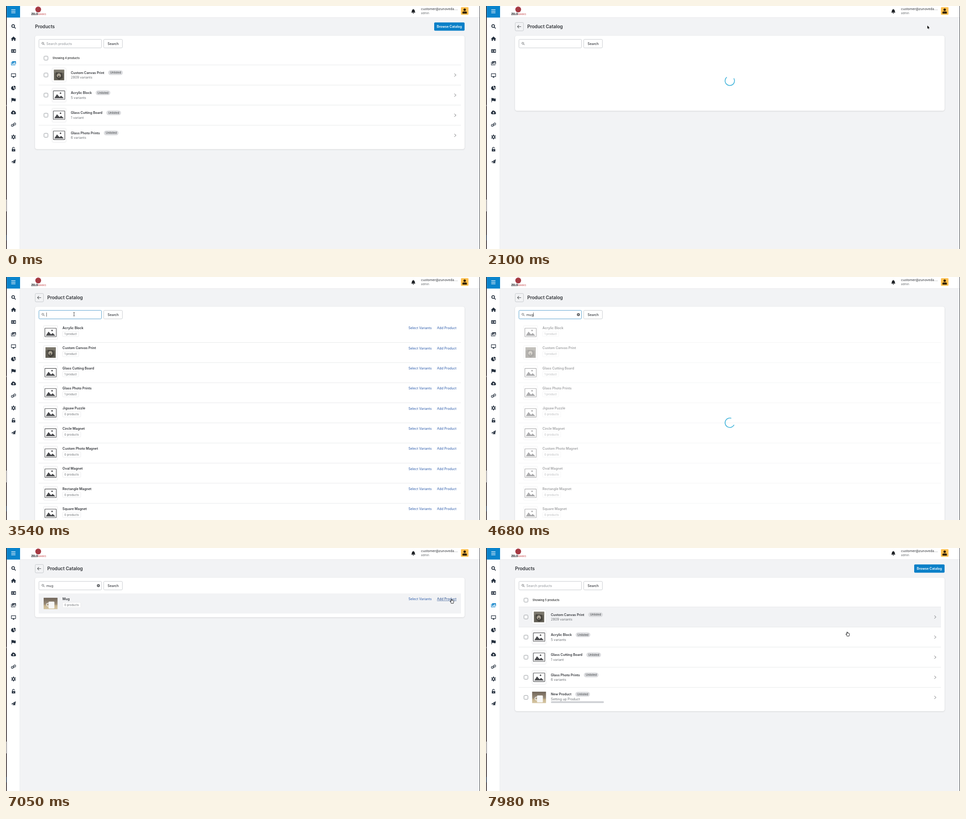
Animation, 1045 px wide and 536 px high, one loop 8000 ms. Source, as an HTML page with a canvas:

```html
<!DOCTYPE html>
<html lang="en">
<head>
<meta charset="utf-8">
<title>Product catalog</title>
<style>
html, body { margin: 0; width: 100%; height: 100%; overflow: hidden; background: #f2f3f5; }
canvas { display: block; width: 1045px; height: 536px; }
</style>
</head>
<body>
<canvas id="stage"></canvas>
<script>
const W = 1045, H = 536, LOOP = 8000, ROW = 44.33;
const INK = '#303338', GREY = '#6d7175', LINE = '#e1e3e5', EDGE = '#babfc3', BLUE = '#0a80c8', LINK = '#2c5cab', BG = '#f2f3f5';
const stage = document.getElementById('stage');
const dpr = window.devicePixelRatio || 1;
stage.width = W * dpr;
stage.height = H * dpr;
const g = stage.getContext('2d');

const catalog = ['Acrylic Block', 'Custom Canvas Print', 'Glass Cutting Board', 'Glass Photo Prints', 'Jigsaw Puzzle',
  'Circle Magnet', 'Custom Photo Magnet', 'Oval Magnet', 'Rectangle Magnet', 'Square Magnet'];
const products = [['Custom Canvas Print', '2809 variants'], ['Acrylic Block', '5 variants'],
  ['Glass Cutting Board', '1 variant'], ['Glass Photo Prints', '6 variants'], ['New Product', 'Setting up Product']];

// Sidebar icons: fill path, stroke path, stroke width
const icons = [
  ['', 'M2.2-.8a3 3 0 1 0-6 0a3 3 0 1 0 6 0M1.5 1.5L4.2 4.2', 1.7],
  ['M-5.5 .2L0-4.8L5.5 .2L4.2 .8V4.6H1.2V1.6H-1.2V4.6H-4.2V.8Z', ''],
  ['M-5.2-3.8H5.2V3.8H-5.2ZM-4-1.5H-.6V-.5H-4ZM-4 .8H-.6V1.8H-4ZM1.2-1.5H4V1.8H1.2Z', ''],
  ['M-3.2-4.4H5.4V2H-3.2ZM-2 1L.2-1.6L1.2-.6L3-2.6L4.4-.2V1Z', 'M-4.8-2.4V3.9H3.6', 1.1],
  ['M-1.2 2.5H1.2L1.8 4.6H-1.8Z', 'M-4.7-4H4.7V2.2H-4.7Z', 1.2],
  ['M-.6-4V.5L2.7 3.7A4.6 4.6 0 1 1-.6-4ZM.6-4.8A4.6 4.6 0 0 1 5-.4H.6ZM1 .6H5A4.6 4.6 0 0 1 3.7 3.3Z', ''],
  ['M-4.6-4.8H-3.6V4.8H-4.6ZM-3.6-4Q-1.5-5 .6-3.9T4.8-3.9V1.8Q2.5 2.8 .6 1.8T-3.6 1.8Z', ''],
  ['M-3.4 4A2.7 2.7 0 0 1-4-1.2A3.3 3.3 0 0 1 1.6-3.2A2.2 2.2 0 0 1 4-.6A2.4 2.4 0 0 1 3.4 4ZM0-1.4L2 .8H.7V2.8H-.7V.8H-2Z', ''],
  ['', 'M-.8 1.4A2 2 0 0 1-.6-1.4L1.2-3.2A2.1 2.1 0 0 1 4.2-.2L3 1M.8-1.4A2 2 0 0 1 .6 1.4L-1.2 3.2A2.1 2.1 0 0 1-4.2 .2L-3-1', 1.3],
  ['', 'M-2.7 0a2.7 2.7 0 1 0 5.4 0a2.7 2.7 0 1 0-5.4 0M0-4.7V-3M0 4.7V3M-4.1-2.35L-2.6-1.5M4.1 2.35L2.6 1.5M-4.1 2.35L-2.6 1.5M4.1-2.35L2.6-1.5', 1.8],
  ['M-3.8-.4H3.8V4.8H-3.8ZM-.6 1.2H.6V3.2H-.6Z', 'M-2.4-.4V-2.2A2.4 2.4 0 0 1 2.2-2.8', 1.3],
  ['M-5 .8L5-5L3.4 4.2L.2 2.8L-1.4 4.9V2.2L3-2.6L-2.6 1.8Z', '']
].map(([f, s, w]) => [new Path2D(f), new Path2D(s), w]);
const arrowPath = new Path2D('M0 0V8.4L1.9 6.6L3.2 9.4L4.6 8.8L3.3 6.1H6Z');
const handPath = new Path2D('M-.9 .4Q0-.6 .9 .4V3Q2-.0 2.6 3.2Q3.8 2.4 4.2 3.6Q5.6 3.2 5.6 4.8V7Q5 8.4 4.8 10H-.6Q-1 8.4-2.6 6.6Q-4 4.6-2.6 4.6L-.9 6Z');
const bellPath = new Path2D('M-4.6 3Q-3.3 1.6-3.2-1A3.2 3.4 0 0 1-.6-4.2V-5.2H.6V-4.2A3.2 3.4 0 0 1 3.2-1Q3.3 1.6 4.6 3ZM-1.4 3.7H1.4Q1.2 5.2 0 5.2T-1.4 3.7Z');

// Pointer path: time, x, y, easing of the segment leading there
const keys = [
  [390, 620, 420], [1170, 973, 43, 'both'], [2480, 973, 43], [2700, 380, 84, 'both'], [2850, 380, 84],
  [3390, 150, 82, 'both'], [5610, 150, 82], [6030, 855, 137, 'in'], [6390, 986, 114, 'out'],
  [6420, 986, 114], [6690, 982, 113, 'both'], [7590, 982, 113], [8370, 612, 257, 'both']
];
const easings = { in: u => u ** 1.5, out: u => 1 - (1 - u) ** 2, both: u => u * u * (3 - 2 * u) };

function pointerAt(t) {
  const i = keys.findIndex(k => k[0] > t);
  if (i < 1) return keys[0].slice(1, 3);
  const [t0, x0, y0] = keys[i - 1], [t1, x1, y1, ease] = keys[i];
  const u = (t - t0) / (t1 - t0), s = ease ? easings[ease](u) : u;
  return [x0 + (x1 - x0) * s, y0 + (y1 - y0) * s];
}

function text(s, x, cy, size = 7.28, color = INK, weight = 400) {
  g.font = `${weight} ${size}px Inter, sans-serif`;
  g.fillStyle = color;
  g.fillText(s, x, cy + size * .36);
  return g.measureText(s).width;
}
function rect(x, y, w, h, color) {
  g.fillStyle = color;
  g.fillRect(x, y, w, h);
}
function box(x, y, w, h, r, fill, stroke, width = .8) {
  g.beginPath();
  g.roundRect(x, y, w, h, r);
  if (fill) { g.fillStyle = fill; g.fill(); }
  if (stroke) { g.strokeStyle = stroke; g.lineWidth = width; g.stroke(); }
}
function disc(x, y, r, color) {
  g.beginPath();
  g.arc(x, y, r, 0, 7);
  g.fillStyle = color;
  g.fill();
}
function poly(pts, color, width) {
  g.beginPath();
  for (let i = 0; i < pts.length; i += 2) g.lineTo(pts[i], pts[i + 1]);
  if (width) { g.strokeStyle = color; g.lineWidth = width; g.stroke(); }
  else { g.fillStyle = color; g.fill(); }
}
function at(x, y, draw) {
  g.save();
  g.translate(x, y);
  draw();
  g.restore();
}

function frameChrome(active) {
  rect(0, 0, W, H, BG);
  rect(31, 0, 1013, 25.5, '#fff');
  rect(31, 25, 1013, .7, LINE);
  rect(1.5, 0, 29.2, H, '#fff');
  rect(30.4, 25, .6, H, '#dfe1e4');
  rect(0, 0, 1.5, H, '#1d1012');
  rect(0, 218, 1, 3, '#777');
  rect(0, 427, 1, 26, '#d8d8d8');
  rect(0, 505, 1, 12, '#1d3f66');
  rect(1044, 0, 1, H, '#3c3f44');
  rect(1.5, 0, 29.5, 25.5, '#0a84cc');
  for (const y of [7.6, 11, 14.4]) rect(11.6, y, 9.2, 1.2, '#fff');
  icons.forEach(([fill, stroke, w], i) => at(16.6, 45 + i * 27.1, () => {
    g.fillStyle = g.strokeStyle = i === 3 && active ? BLUE : '#273240';
    g.lineWidth = w || 1;
    g.lineCap = 'round';
    g.fill(fill, 'evenodd');
    if (w) g.stroke(stroke);
  }));
  disc(71, 7.6, 6.4, '#a63a43');
  const w = text('ZELO', 55.5, 18, 5.7, '#1f1f24', 800);
  text('MARKS', 55.5 + w, 18, 5.2, '#c5484b', 400);
  at(898, 11.6, () => { g.fillStyle = '#202327'; g.fill(bellPath); });
  text('customer@zunoveda....', 915, 6.8, 7.28, INK);
  text('admin', 915, 16.2, 6.24, GREY);
  box(1003, 2.4, 16.6, 16.8, 1.5, '#ffc04f');
  disc(1011.2, 8.2, 2.7, '#33240a');
  box(1006.2, 11.9, 10, 4.8, [2.4, 2.4, 1, 1], '#33240a');
}

function card(bottom) {
  g.save();
  g.shadowColor = 'rgba(23,24,24,.16)';
  g.shadowBlur = 3 * dpr;
  g.shadowOffsetY = .8 * dpr;
  box(64, 65.6, 947, bottom - 65.6, 4.2, '#fff');
  g.restore();
}

function searchBar(value, hint, focused, caret) {
  box(72.6, 73.6, 138, 18.8, 2.1, '#fff', focused ? '#5ba3cf' : EDGE, focused ? 1 : .8);
  g.beginPath();
  g.arc(81.2, 82.2, 2.1, 0, 7);
  g.strokeStyle = '#5c5f62';
  g.lineWidth = .9;
  g.stroke();
  poly([82.8, 83.8, 85, 86], '#5c5f62', 1);
  let end = 89;
  if (value) {
    end += text(value, 89, 83);
    disc(203.7, 83, 3.3, '#5c5f62');
    poly([202.5, 81.8, 204.9, 84.2], '#fff', .8);
    poly([204.9, 81.8, 202.5, 84.2], '#fff', .8);
  } else if (hint) text(hint, 89, 83, 7.28, '#8c9196');
  if (caret) {
    g.globalAlpha = caret;
    rect(end, 78.4, .7, 9, '#202223');
    g.globalAlpha = 1;
  }
  box(215.4, 73.6, 41.2, 18.8, 2.1, '#fff', EDGE);
  text('Search', 224, 83, 7.28, INK, 500);
}

function placeholder(x, y) {
  box(x - 12.6, y - 9.4, 25.2, 18.8, .8, '#fff', '#4a4b4e', 1.1);
  poly([x - 10.5, y + 7, x - 4.6, y - 2, x + 1, y + 4.2, x + 4.6, y + 1.2, x + 10.5, y + 7], '#4a4b4e');
  disc(x + 3.2, y - 4.4, 1.7, '#4a4b4e');
}
function canvasPhoto(x, y) {
  rect(x - 11.3, y - 11.6, 22.6, 23.2, '#625f55');
  rect(x - 11.3, y - 11.6, 22.6, 7, '#7b776c');
  poly([x - 7, y - 6, x + 6, y - 5, x + 8, y + 6, x, y + 11, x - 6, y + 6], '#45423c');
  disc(x - .5, y + 1, 4.6, '#aaa394');
  disc(x - .5, y + 3.2, 1.6, '#3c3833');
}
function mugPhoto(x, y) {
  const wall = g.createLinearGradient(0, y - 12.6, 0, y + 12.6);
  wall.addColorStop(0, '#6f6459');
  wall.addColorStop(.55, '#9a8c78');
  wall.addColorStop(.7, '#c9b68f');
  wall.addColorStop(1, '#d6c7a6');
  rect(x - 15.3, y - 12.6, 30.6, 25.2, wall);
  g.beginPath();
  g.arc(x - 5.6, y + 2.6, 3.3, 0, 7);
  g.strokeStyle = '#eee';
  g.lineWidth = 1.6;
  g.stroke();
  box(x - 4.6, y - 4.2, 13, 15.2, 1.6, '#f7f7f6');
}
function thumb(name, x, y) {
  if (name === 'Mug' || name === 'New Product') return mugPhoto(x, y);
  box(x - 15.3, y - 15.3, 30.6, 30.6, 1.8, '#fff', LINE);
  (name === 'Custom Canvas Print' ? canvasPhoto : placeholder)(x, y);
}
function checkbox(y) {
  box(83.8, y - 4.3, 8.6, 8.6, 1.7, '#fff', '#8c9196', .95);
}

function productsPage(count, hover) {
  text('Products', 64, 45.4, 10.05, INK, 600);
  box(944, 36.2, 67, 18.4, 2.1, BLUE);
  text('Browse Catalog', 949.8, 45.3, 7.28, '#fff', 600);
  card(count ? 138.4 + count * ROW : 231);
  searchBar('', 'Search products');
  if (!count) return;
  checkbox(115);
  text(`Showing ${count} products`, 102.5, 115, 6.24, '#202223', 500);
  products.slice(0, count).forEach(([name, note], i) => {
    const y = 130 + i * ROW, busy = i === 4, dy = busy ? -1.8 : 0;
    if (hover[1] > y && hover[1] < y + ROW) rect(72, y, 931, ROW, BG);
    rect(72, y - .4, 931, .8, LINE);
    checkbox(y + 22.2);
    thumb(name, 117, y + 22.2);
    const w = text(name, 143, y + 17 + dy, 7.28, INK, 600);
    box(151.6 + w, y + 11.8 + dy, 32.4, 10.4, 5.2, '#dcdde0');
    text('Unlisted', 155.8 + w, y + 17 + dy, 6.24, '#3d4043');
    text(note, 143, y + 27.6 + dy, 7.28, GREY);
    if (busy) box(143, y + 30.6, 117, 4.2, 2, '#d0d2d6');
    poly([988.6, y + 19, 991.9, y + 22.3, 988.6, y + 25.6], '#5c5f62', 1);
  });
}

function catalogRow(name, i, note, pale, over, underline) {
  const y = 100.2 + i * ROW;
  if (over) box(72, y, 931, ROW, 1, BG);
  if (i) rect(72, y - .4, 931, .8, LINE);
  thumb(name, 98.3, y + 22.2);
  text(name, 124.6, y + 12.2, 7.28, INK, 600);
  g.font = '400 6.24px Inter, sans-serif';
  box(124.8, y + 19.8, g.measureText(note).width + 8.2, 11.4, 1.6, '#fff', LINE, .6);
  text(note, 128.8, y + 25.5, 6.24, GREY);
  if (pale) return;
  text('Select Variants', 887.2, y + 12.5, 7.28, LINK);
  const w = text('Add Product', 950.2, y + 12.5, 7.28, underline ? '#1f4789' : LINK);
  if (underline) rect(950.2, y + 16.2, w, .6, '#1f4789');
}

function spinner(x, y, t) {
  const turn = (t - 4680) / 500 * Math.PI * 2;
  g.beginPath();
  g.arc(x, y, 10.4, turn + .5, turn + 4.95);
  g.strokeStyle = '#4fb9dd';
  g.lineWidth = 1.8;
  g.lineCap = 'round';
  g.stroke();
}

function caretAlpha(t) {
  if (t < 3480 || t >= 5340) return 0;
  if (t < 3720 || t >= 3930) return 1;
  return Math.max(0, 1 - (t - 3720) / 120);
}

function catalogPage(t, pos, hover) {
  box(64.4, 36.4, 18.2, 18.4, 2.1, BG, EDGE);
  poly([69.4, 45.5, 77.4, 45.5], '#5c5f62', 1.1);
  poly([72.6, 42.2, 69.3, 45.5, 72.6, 48.8], '#5c5f62', 1.1);
  text('Product Catalog', 91, 45.4, 10.05, INK, 600);
  const waiting = t < 2370, found = t >= 4890, pale = t >= 4680 && !found;
  card(waiting ? 231 : found ? 152.8 : 560);
  if (found) {
    const over = t > 5610 && hover[1] > 100 && hover[1] < 144.5;
    catalogRow('Mug', 0, '0 products', false, over, pos[0] > 950 && pos[1] < 118);
  } else if (!waiting) {
    catalog.forEach((name, i) => catalogRow(name, i, i < 4 ? '1 product' : '0 products', pale));
    if (pale) rect(66, 97, 943, H - 97, 'rgba(255,255,255,.54)');
  }
  const value = t < 4110 ? '' : t < 4290 ? 'm' : t < 4440 ? 'mu' : 'mug';
  searchBar(value, '', t >= 3480 && t < 6870, caretAlpha(t));
  if (waiting) spinner(537.5, 165, t);
  if (pale) spinner(537.5, 321.5, t);
}

function clickRing(t, start, length, x, y) {
  if (t < start || t >= start + length) return;
  const u = (t - start) / length;
  g.globalAlpha = Math.min(1, 2 * (1 - u));
  g.beginPath();
  g.arc(x, y, 10.8, 0, 7);
  g.strokeStyle = '#0c0c0e';
  g.lineWidth = 1.9;
  g.stroke();
  g.globalAlpha = 1;
}

function pointer(t, [x, y], onProducts) {
  if (t < 390 || (t >= 4110 && t < 5610)) return;
  const inField = !onProducts && x > 73 && x < 211 && y > 73 && y < 93;
  const overRow = x > 72 && x < 1003 && (onProducts
    ? (t < 1560 && y > 130 && y < 307) || (t >= 7590 && y > 130)
    : t >= 4890 && y > 100 && y < 145);
  at(x, y, () => {
    g.lineJoin = 'round';
    if (inField) {
      poly([-1.6, -4.2, 0, -3.5, 1.6, -4.2], '#222', .8);
      poly([0, -3.5, 0, 3.5], '#222', .8);
      poly([-1.6, 4.2, 0, 3.5, 1.6, 4.2], '#222', .8);
      return;
    }
    const path = overRow ? handPath : arrowPath;
    g.strokeStyle = overRow ? '#16171a' : '#fff';
    g.fillStyle = overRow ? '#fff' : '#0b0b0c';
    g.lineWidth = 1.1;
    if (overRow) { g.scale(.9, .9); g.fill(path); g.stroke(path); }
    else { g.scale(.85, .85); g.stroke(path); g.fill(path); }
  });
}

function draw(now) {
  const t = now % LOOP;
  const onProducts = t < 1560 || t >= 7410;
  const pos = pointerAt(t), hover = t < 420 ? [0, 0] : pointerAt(t - 60);
  g.setTransform(dpr, 0, 0, dpr, 0, 0);
  frameChrome(onProducts);
  g.lineCap = 'butt';
  if (onProducts) productsPage(t < 1560 ? 4 : t < 7590 ? 0 : 5, hover);
  else catalogPage(t, pos, hover);
  clickRing(t, 1260, 150, 973, 44);
  clickRing(t, 3390, 150, 150, 82);
  clickRing(t, 6840, 210, 984.5, 117.5);
  pointer(t, pos, onProducts);
  requestAnimationFrame(draw);
}
requestAnimationFrame(draw);
</script>
</body>
</html>
```
